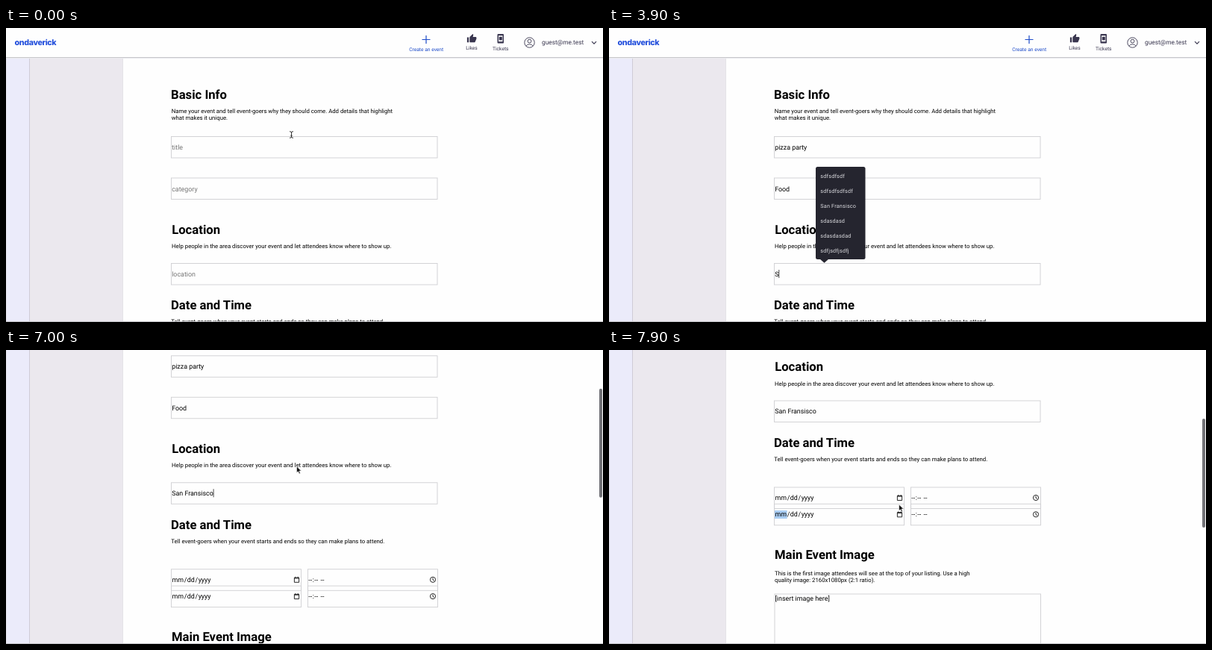
Write an HTML page that moves like this. It is 800 px wide and 394 px high and loops after 8000 ms.

```html
<!DOCTYPE html>
<html lang="en">
<head>
<meta charset="utf-8">
<title>Create an event</title>
<style>
  html, body { margin: 0; width: 100%; height: 100%; overflow: hidden; background: #fefefe; }
  svg { display: block; font: 8.89px Roboto, sans-serif; text-rendering: geometricPrecision; }
  text { white-space: pre; }
  .head { font-size: 16.67px; font-weight: 700; }
  .note { font-size: 7.78px; }
  .nav { font-size: 6.67px; text-anchor: middle; fill: #39364f; }
  .box { fill: none; stroke: #cfcfd2; stroke-width: .9; }
  .line { fill: none; stroke: #39364f; }
  .blue { fill: #1d4bc9; stroke: #1d4bc9; }
  .hint { fill: #757575; }
  .item { font-size: 7.22px; letter-spacing: .2px; fill: #dcdce0; }
</style>
</head>
<body>
<svg width="800" height="394" viewBox="0 0 800 394">
  <path fill="#ebebfa" d="M0 0h31v394H0z"/>
  <path fill="#ebe8ee" d="M31 0h125.500v394H31z"/>
  <path stroke="#cfccd6" d="M31.500 0v394"/>
  <path stroke="#dddbe1" stroke-width=".7" d="M156.500 0v394M.3 0v394"/>

  <g id="page">
    <path fill="#fefefe" d="M0 0h800v39H0z"/>
    <path stroke="#c6c6ca" d="M0 39.500h800"/>
    <path stroke="#ececf0" d="M0 40.500h800"/>
    <text x="11.500" y="23" fill="#2450dc" font-family="Inter, sans-serif" font-size="10.700" font-weight="800" letter-spacing="-.35">ondaverick</text>
    <path class="blue" stroke-width="1.200" d="M557.500 15.500h11M563 10v11"/>
    <text class="nav" style="fill:#1d4bc9" x="563.200" y="30.700">Create an event</text>
    <path fill="#39364f" transform="translate(617.300 7.400) scale(.57)" d="M1 21h4V9H1zM23 10c0-1.100-.9-2-2-2h-6.300l1-4.900c0-.4-.2-.8-.5-1L14.200 1 7.600 7.600C7.200 8 7 8.500 7 9v10c0 1.100.9 2 2 2h9c.8 0 1.500-.5 1.800-1.200l3-7c.1-.3.2-.5.2-.8z"/>
    <text class="nav" x="624" y="29.300">Likes</text>
    <rect x="658.500" y="8" width="8.500" height="12.500" rx="1" fill="#39364f"/>
    <path fill="#fefefe" d="M660 10.200h5.500v8H660z"/>
    <path fill="#39364f" d="M660.800 11.800h4v4.500h-4z"/>
    <text class="nav" x="662.800" y="29.500">Tickets</text>
    <g class="line" stroke-width=".9">
      <circle cx="701.500" cy="19.500" r="6.700"/>
      <circle cx="701.500" cy="17.600" r="2.400"/>
      <path d="M697 24.300c1-3.200 8-3.200 9 0"/>
      <path stroke-width="1.200" d="M785 18.200l3 3 3-3"/>
    </g>
    <text x="718" y="22.400" font-size="8.330" fill="#39364f">guest@me.test</text>

    <text class="head" x="221" y="94.500">Basic Info</text>
    <text class="note" x="221.700" y="114">Name your event and tell event-goers why they should come. Add details that highlight</text>
    <text class="note" x="221.700" y="123">what makes it unique.</text>
    <rect class="box" x="221.500" y="145.500" width="356.500" height="28.500"/>
    <text id="title" x="222.200" y="163"></text>
    <rect class="box" x="221.500" y="201" width="356.500" height="28.500"/>
    <text id="category" x="222.200" y="218.500"></text>

    <text class="head" x="222.200" y="275.500">Location</text>
    <text class="note" x="222" y="295">Help people in the area discover your event and let attendees know where to show up.</text>
    <rect class="box" x="221.500" y="315.500" width="356.500" height="28.500"/>
    <text id="location" x="222.200" y="332.500"></text>

    <text class="head" x="221" y="377.300">Date and Time</text>
    <text class="note" x="221.300" y="396.300">Tell event-goers when your event starts and ends so they can make plans to attend.</text>
    <path id="selection" fill="#a9cdf3" d="M222 462.500h16.700v11H222z"/>
    <g id="row">
      <rect class="box" x="221.500" y="431.500" width="174" height="28.500"/>
      <rect class="box" x="404.500" y="431.500" width="174" height="28.500"/>
      <text x="222.500" y="448.500">mm<tspan dx=".55">/</tspan><tspan dx=".55">dd</tspan><tspan dx=".55">/</tspan><tspan dx=".55">yyyy</tspan></text>
      <text x="405.200" y="448.500">--<tspan dx=".55">:</tspan><tspan dx=".55">--</tspan><tspan dx=".55"> </tspan><tspan dx=".55">--</tspan></text>
      <g fill="none" stroke="#111" stroke-width=".9">
        <path d="M386.400 442.800h6.200v6.200h-6.200zM386.400 443.600h6.200M387.800 441.500v1.500M391.200 441.500v1.500"/>
        <circle cx="572" cy="445.500" r="3.600"/>
        <path d="M572 443.200v2.500l1.800 1.100"/>
      </g>
    </g>
    <use href="#row" y="22.300"/>

    <text class="head" x="222" y="527.500">Main Event Image</text>
    <text class="note" x="222" y="549.500">This is the first image attendees will see at the top of your listing. Use a high</text>
    <text class="note" x="222" y="558.500">quality image: 2160x1080px (2:1 ratio).</text>
    <rect class="box" x="222" y="574.500" width="356.500" height="120"/>
    <text x="222.500" y="583.300">[insert image here]</text>

    <path id="caret" stroke="#000" stroke-width=".7" d="M0-8.500V2.500"/>
  </g>

  <g id="above">
    <path fill="#25252f" d="M282.500 309.500h12l-6 5.300z"/>
    <rect x="277" y="186" width="66.500" height="124" rx="2.500" fill="#25252f"/>
  </g>
  <g id="below">
    <path fill="#25252f" d="M282.500 351.500h12l-6-5.300z"/>
    <rect x="277" y="351" width="66.500" height="24.500" rx="2.500" fill="#25252f"/>
    <text class="item" x="283.300" y="365.800">San Fransisco</text>
  </g>
  <rect id="thumb" x="795" width="4" height="146" rx="2" fill="#707075"/>
  <path stroke="#c2c2c6" d="M0 393.500h800"/>
  <path id="beam" fill="none" stroke="#222" stroke-width=".9" d="M-2.500-4.300Q0-4.300 0-3Q0-4.300 2.500-4.300M0-3.500V3.500M-2.500 4.300Q0 4.300 0 3Q0 4.300 2.500 4.300M-1.200 1.200h2.400"/>
  <path id="arrow" fill="#111" stroke="#fff" stroke-width=".6" d="M0-1V7.600l2-1.900 1.400 3.200 1.500-.6-1.400-3.200h2.700z"/>
</svg>
<script>
const $ = id => document.getElementById(id);
const show = (id, on) => $(id).style.display = on ? '' : 'none';
const move = (id, x, y) => $(id).setAttribute('transform', `translate(${x} ${y})`);

['sdfsdfsdf', 'sdfsdfsdfsdf', 'San Fransisco', 'sdasdasd', 'sdasdasdad', 'sdfjsdfjsdfj'].forEach((label, i) =>
  $('above').insertAdjacentHTML('beforeend', `<text class="item" x="283.3" y="${201 + 20 * i}">${label}</text>`));

const LOOP = 8000, STEP = 100;
const titleKeys = [900, 1100, 1200, 1300, 1400, 1500, 1600, 1700, 1700, 1900, 2000];
const categoryKeys = [2500, 2600, 2800, 2900];
const locationKeys = [3900, 4000, 4200, 4300, 4500, 4600, 4700, 4800, 4900, 5000, 5100];
const fixKeys = [5800, 5900, 6000];
const FOCUS = [['title', 800], ['category', 2200], ['location', 3200]];
const BACKSPACE = 5600, BLUR = 7800;
const caretResets = [...FOCUS.map(f => f[1]), ...titleKeys, ...categoryKeys, ...locationKeys, BACKSPACE, ...fixKeys];
const inputs = [[145, 174], [201, 230], [315, 344]];

const scrollPath = [[6400, 0], [6500, 5], [6600, 22], [6700, 48], [7200, 197.5], [7300, 229], [7400, 240], [7600, 247.5]];
const pointerPath = [[200, 143], [400, 161.5], [600, 161.5], [700, 152.5], [6400, 157], [7500, 157], [7800, 208]];

function along(path, t) {
  if (t <= path[0][0]) return path[0][1];
  for (let i = 1; i < path.length; i++) {
    const [t0, a] = path[i - 1], [t1, b] = path[i];
    if (t <= t1) return a + (b - a) * (t - t0) / (t1 - t0);
  }
  return path[path.length - 1][1];
}

const typed = (text, keys, t) => text.slice(0, keys.filter(k => k <= t).length);

function setField(id, text) {
  $(id).textContent = text || id;
  $(id).setAttribute('class', text ? '' : 'hint');
}

function draw(t) {
  const values = {
    title: typed('pizza party', titleKeys, t),
    category: typed('Food', categoryKeys, t),
    location: t < BACKSPACE ? typed('San Fransic', locationKeys, t) : 'San Fransi' + typed('sco', fixKeys, t)
  };
  for (const id in values) setField(id, values[id]);

  const scroll = along(scrollPath, t);
  move('page', 0, -scroll);
  $('thumb').setAttribute('y', 1 + .368 * scroll);
  show('thumb', scroll > 0);

  const focused = FOCUS.filter(f => f[1] <= t).pop();
  const lastReset = Math.max(...caretResets.filter(k => k <= t));
  const caretOn = focused && t < BLUR && (t - lastReset) % 1000 < 500;
  show('caret', caretOn);
  if (caretOn) {
    const field = $(focused[0]);
    const width = values[focused[0]] ? field.getComputedTextLength() : 0;
    move('caret', 222.5 + width, field.getAttribute('y'));
  }
  show('selection', t > BLUR);

  show('above', t >= 3900 && t < 4100);
  show('below', t >= 4100 && t < 5100 || t >= 5700 && t < 6200);
  $('below').style.opacity = t === 6100 ? .5 : 1;

  const x = t < 6500 ? 382.5 : t < 7700 ? 389.5 : 388.5;
  const y = along(pointerPath, t);
  const visible = t < 900 || t >= 6500;
  const overInput = t < 900 || inputs.some(([top, bottom]) => y + scroll >= top && y + scroll <= bottom);
  show('beam', visible && overInput);
  show('arrow', visible && !overInput);
  move('beam', x, y);
  move('arrow', x, y);
}

function tick() {
  draw(Math.floor(performance.now() % LOOP / STEP) * STEP);
  requestAnimationFrame(tick);
}
tick();
</script>
</body>
</html>
```
